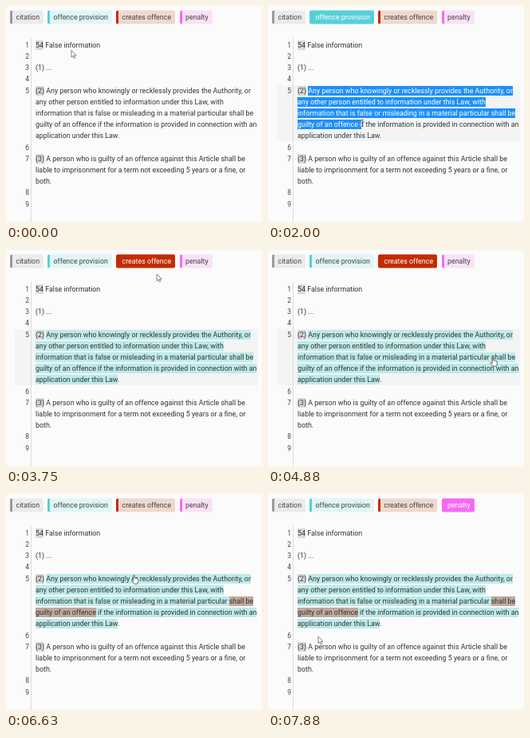
An HTML page for the animation above (8 s loop, 321 px wide and 270 px high).

```html
<!DOCTYPE html>
<html lang="en">
<head>
<meta charset="utf-8">
<title>Annotating a provision</title>
<style>
  html, body { margin: 0; width: 100%; height: 100%; overflow: hidden; background: #fbfbfb; }
  body { position: relative; font: 8.89px/14.2px Roboto, Arial, sans-serif; color: #333; }
  body > * { position: absolute; }
  .chip {
    top: 5px; height: 17px; line-height: 17px; padding: 0 5px 0 4.5px; box-sizing: border-box;
    border-left: 3px solid var(--main); border-radius: 2px; transform: translateY(.5px);
    background: var(--pale); color: #444; white-space: pre;
  }
  .chip.on { background: var(--main); color: #fff; }
  .gutter { left: 31px; top: 40px; width: 1px; bottom: 0; background: #dcdcdc; }
  .active { left: 11px; top: 99px; width: 305px; height: 70px; background: #f3f4f4; }
  .num { left: 0; width: 29px; text-align: right; font-size: 8.5px; color: #444; }
  .row { left: 37px; white-space: pre; }
  .row span { padding: 1px 0; }
  .tag { background: #dadbdb; }
  .teal { background: #bdeaea; }
  .brown { background: #c2a89d; }
  .sel { background: #1e8ffa; color: #fff; }
  svg { left: 0; top: 0; width: 16px; height: 16px; overflow: visible; }
  svg g { display: none; }
  svg g.show { display: inline; }
</style>
</head>
<body>
<div class="active" id="active"></div>
<div class="gutter"></div>
<svg id="cursor" viewBox="0 0 16 16">
  <g id="arrow"><path d="M0 0V8.6L2 6.8L3.3 9.8L4.7 9.2L3.4 6.3H6.1Z" fill="#fff" stroke="#666" stroke-width=".8"/></g>
  <g id="beam"><path d="M-1.4 -4H1.4M0 -4V4M-1.4 4H1.4" fill="none" stroke="#555" stroke-width=".8"/></g>
  <g id="hand"><path d="M1.2 .6Q2 -.5 2.8 .6V4.2Q3.8 3.6 4.4 4.6Q5.3 4 5.9 5Q7.3 4.6 7.3 6V8.4L6.3 11.3H2.2L-.8 7.4Q-1 6.2 .2 6.5L1.2 7.5Z" fill="#fff" stroke="#444" stroke-width=".8" stroke-linejoin="round"/></g>
</svg>
<script>
const LOOP = 8000, STEP = 125, TOP = 41.7, PITCH = 14.2, LEFT = 37, PARA = 4;
const $ = id => document.getElementById(id);
const cursor = $('cursor');

function add(cls, text, style) {
  const el = document.createElement('div');
  el.className = cls;
  el.textContent = text;
  Object.assign(el.style, style);
  document.body.insertBefore(el, cursor);
  return el;
}
const atRow = n => ({ top: TOP + n * PITCH + 'px' });

const chips = [
  ['citation', 5, '#9b9b9b', '#ecebeb'],
  ['offence provision', 52, '#55d0d6', '#e0f5f6'],
  ['creates offence', 138, '#c12d00', '#efd8cf'],
  ['penalty', 217.5, '#f56af3', '#fae1f8']
].map(([name, x, main, pale]) => {
  const el = add('chip', name, { left: x + 'px' });
  el.style.setProperty('--main', main);
  el.style.setProperty('--pale', pale);
  return el;
});

[0, 1, 2, 3, 4, 9, 10, 13, 14].forEach((row, i) => add('num', i + 1, atRow(row)));

const para = [
  '(2) Any person who knowingly or recklessly provides the Authority, or',
  'any other person entitled to information under this Law, with',
  'information that is false or misleading in a material particular shall be',
  'guilty of an offence if the information is provided in connection with an',
  'application under this Law.'
];
const starts = para.map((_, i) => para.slice(0, i).join('').length);
const total = para.join('').length;
const rows = para.map((text, i) => add('row', text, atRow(PARA + i)));

function addTagged(row, tag, text) {
  add('row', '', atRow(row)).innerHTML = `<span class="tag">${tag}</span>${text}`;
}
addTagged(0, '54', ' False information');
add('row', '(1) ...', atRow(2));
addTagged(10, '(3)', ' A person who is guilty of an offence against this Article shall be');
add('row', 'liable to imprisonment for a term not exceeding 5 years or a fine, or', atRow(11));
add('row', 'both.', atRow(12));

// Pointer stops: time, x, y
const stops = [
  [0, 82, 55.5], [500, 94, 14], [750, 94, 14], [1250, 53.5, 107.5], [1500, 53.5, 107.5],
  [2250, 141, 160], [2500, 141, 160], [2875, 131, 83.5], [3250, 176, 15], [3500, 176, 15],
  [4625, 280, 134], [5000, 280, 134], [5250, 304, 136], [5875, 84, 148],
  [6250, 114, 148], [6375, 114, 148], [7000, 240.5, 15], [7375, 240.5, 15],
  [7875, 63, 178], [8000, 62, 183]
];
const shall = starts[2] + para[2].indexOf('shall');
const offenceEnd = starts[3] + 'guilty of an offence'.length;
const DRAG1 = [1500, 2500], DRAG2 = [5000, 6375];
const within = (t, [a, b]) => t >= a && t < b;

function pointer(t) {
  const i = stops.findIndex(s => s[0] > t);
  const [t0, x0, y0] = stops[i - 1], [t1, x1, y1] = stops[i];
  const p = (t - t0) / (t1 - t0), e = p * p * (3 - 2 * p);
  return [x0 + (x1 - x0) * e, y0 + (y1 - y0) * e];
}

const pen = document.createElement('canvas').getContext('2d');
pen.font = '8.89px Roboto, Arial, sans-serif';

// Index of the character gap nearest to a point
function caret(x, y) {
  const row = Math.max(0, Math.min(4, Math.floor((y - TOP) / PITCH) - PARA));
  const text = para[row];
  let best = 0, gap = Infinity;
  for (let n = 0; n <= text.length; n++) {
    const d = Math.abs(LEFT + pen.measureText(text.slice(0, n)).width - x);
    if (d < gap) { gap = d; best = n; }
  }
  return starts[row] + best;
}

function kindOf(t, x, y) {
  if (y < 23) return 'hand';
  const row = Math.floor((y - TOP) / PITCH);
  if (row >= PARA && row < PARA + 5) return t < DRAG1[1] ? 'beam' : 'hand';
  return row === 0 && x > LEFT && x < 119 && y < 55 ? 'beam' : 'arrow';
}

function paintPara(classOf) {
  para.forEach((text, r) => {
    let html = '', last = null;
    [...text].forEach((ch, i) => {
      const cls = classOf(starts[r] + i);
      if (cls !== last) {
        html += `${last === null ? '' : '</span>'}<span class="${cls}">`;
        last = cls;
      }
      html += ch;
    });
    rows[r].innerHTML = html + '</span>';
  });
}

function draw(t) {
  const [x, y] = pointer(t);
  const kind = kindOf(t, x, y);
  cursor.style.transform = `translate(${x}px, ${y}px)`;
  for (const k of ['arrow', 'beam', 'hand']) $(k).classList.toggle('show', k === kind);

  const on = [null, [625, DRAG1[1]], [3500, DRAG2[1]], [7250, LOOP]];
  chips.forEach((c, i) => c.classList.toggle('on', !!on[i] && within(t, on[i])));
  $('active').style.display = within(t, [1250, DRAG2[1]]) ? 'block' : 'none';

  let from = 0, to = 0;
  const anchor = within(t, DRAG1) ? 4 : within(t, DRAG2) ? shall : -1;
  if (anchor >= 0) {
    const end = Math.min(caret(x, y), total - 1);
    from = Math.min(anchor, end);
    to = Math.max(anchor, end);
  }
  paintPara(i => {
    if (i >= from && i < to) return 'sel';
    if (i < 3) return 'tag';
    if (t >= DRAG2[1] && i >= shall && i < offenceEnd) return 'brown';
    return t >= DRAG1[1] && i >= 4 && i < total - 1 ? 'teal' : '';
  });
}

const begin = performance.now();
let shown = -1;
function tick() {
  const t = Math.floor((performance.now() - begin) % LOOP / STEP) * STEP;
  if (t !== shown) draw(shown = t);
  requestAnimationFrame(tick);
}
tick();
</script>
</body>
</html>
```
